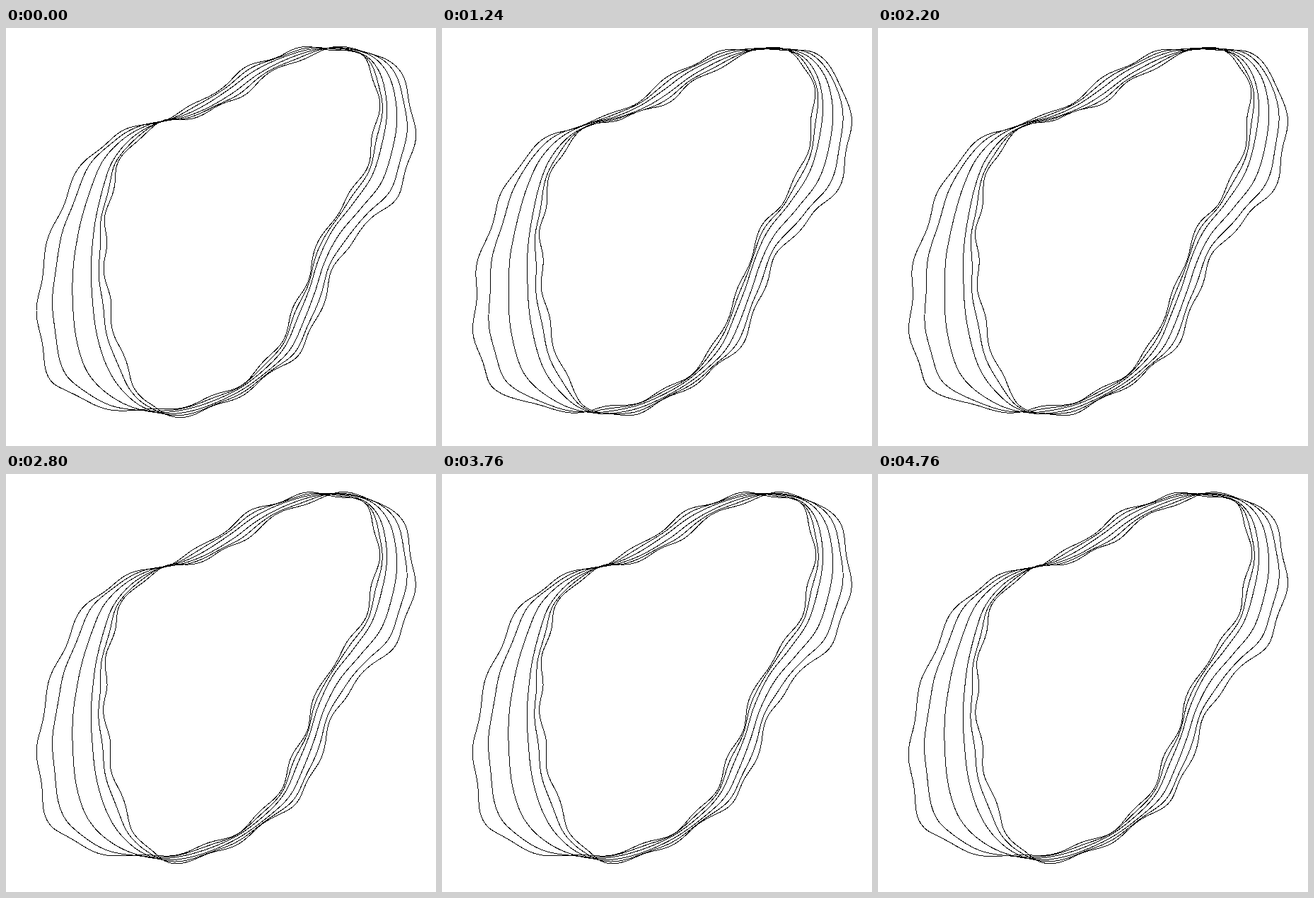
An HTML page for the animation above (4.8 s loop, 608 by 591 pixels).

```html
<!DOCTYPE html>
<html>
<head>
<meta charset="utf-8">
<style>
html, body { margin: 0; height: 100%; overflow: hidden; background: #fff }
svg { display: block; width: 608px; height: 591px }
path { fill: none; stroke: #000; stroke-width: 1; shape-rendering: crispEdges }
</style>
</head>
<body>
<svg viewBox="0 0 608 591"></svg>
<script>
// Two limiting outlines, counterclockwise from the left; the other loops lie between them.
const first = [
  49,350, 46,400, 49,450, 63,493, 84,514, 120,531, 162,539, 205,541.5, 245,535,
  285,525, 325,507, 360,480, 386,447, 404,406, 421,368, 435,325, 455,280, 482,243,
  507,200, 521,150, 526,105, 519,65, 500,39, 465,29, 425,29, 385,38, 345,55,
  308,80, 270,107, 235,125, 190,138, 150,156, 116,183, 92,223, 74,262, 60,305];
const last = [
  140,322, 143,365, 149,408, 160,450, 171,482, 183,507, 203,533, 228,547, 268,545,
  305,532, 345,510, 385,482, 415,457, 436,420, 450,380, 466,337, 487,303, 522,267,
  556,231, 574,175, 576,125, 563,75, 533,42, 495,29, 450,32, 405,48, 362,73,
  328,98, 295,115, 260,126, 222,134, 187,155, 163,187, 151,222, 144,257, 140.5,290];
const leftMix = [0, .22, .51, .79, .91, 1];
const rightMix = [0, .09, .22, .5, .78, 1];
const STEPS = 8, WAVES = 17, PERIOD = 960, FRAME = 40, SWELL = 3;
const lerp = (a, b, t) => a + (b - a) * t;

// Closed Catmull-Rom curve as a list of [x, y]
function smooth(flat) {
  const n = flat.length / 2, out = [];
  for (let i = 0; i < n; i++)
    for (let j = 0; j < STEPS; j++) {
      const t = j / STEPS;
      out.push([0, 1].map(c => {
        const [a, b, d, e] = [-1, 0, 1, 2].map(k => flat[(i + k + n) % n * 2 + c]);
        return b + t / 2 * (d - a + t * (2 * a - 5 * b + 4 * d - e + t * (3 * (b - d) + e - a)));
      }));
    }
  return out;
}

const A = smooth(first), F = smooth(last), count = A.length;
const middle = A.map(([x, y], i) => [(x + F[i][0]) / 2, (y + F[i][1]) / 2]);
const arc = [0];
for (let i = 1; i <= count; i++) {
  const p = middle[i - 1], q = middle[i % count];
  arc.push(arc[i - 1] + Math.hypot(q[0] - p[0], q[1] - p[1]));
}

const frame = middle.map(([x, y], i) => {
  const p = middle[(i + count - 1) % count], q = middle[(i + 1) % count];
  const dx = q[0] - p[0], dy = q[1] - p[1], d = Math.hypot(dx, dy);
  return {
    nx: -dy / d, ny: dx / d,
    side: (1 + (x - 310) / Math.hypot(x - 310, y - 290)) / 2,
    turn: WAVES * (arc[i] - arc[STEPS]) / arc[count]
  };
});

const svg = document.querySelector('svg');
const loops = leftMix.map((_, i) => {
  const path = svg.appendChild(document.createElementNS('http://www.w3.org/2000/svg', 'path'));
  const points = frame.map(({ side }, j) => {
    const m = lerp(leftMix[i], rightMix[i], side);
    return [lerp(A[j][0], F[j][0], m), lerp(A[j][1], F[j][1], m)];
  });
  return { path, points, swell: SWELL * Math.abs(i / 2.5 - 1) ** 1.6, lag: i / 20 };
});

function draw(now) {
  const time = Math.floor(now / FRAME) * FRAME % PERIOD / PERIOD;
  for (const { path, points, swell, lag } of loops) {
    const d = points.map(([x, y], j) => {
      const { nx, ny, turn } = frame[j];
      const w = swell * Math.cos(2 * Math.PI * (turn + lag - time));
      return (x + nx * w).toFixed(2) + ' ' + (y + ny * w).toFixed(2);
    });
    path.setAttribute('d', 'M' + d.join('L') + 'Z');
  }
}

const start = performance.now();
function tick() {
  draw(performance.now() - start);
  requestAnimationFrame(tick);
}
tick();
</script>
</body>
</html>
```
